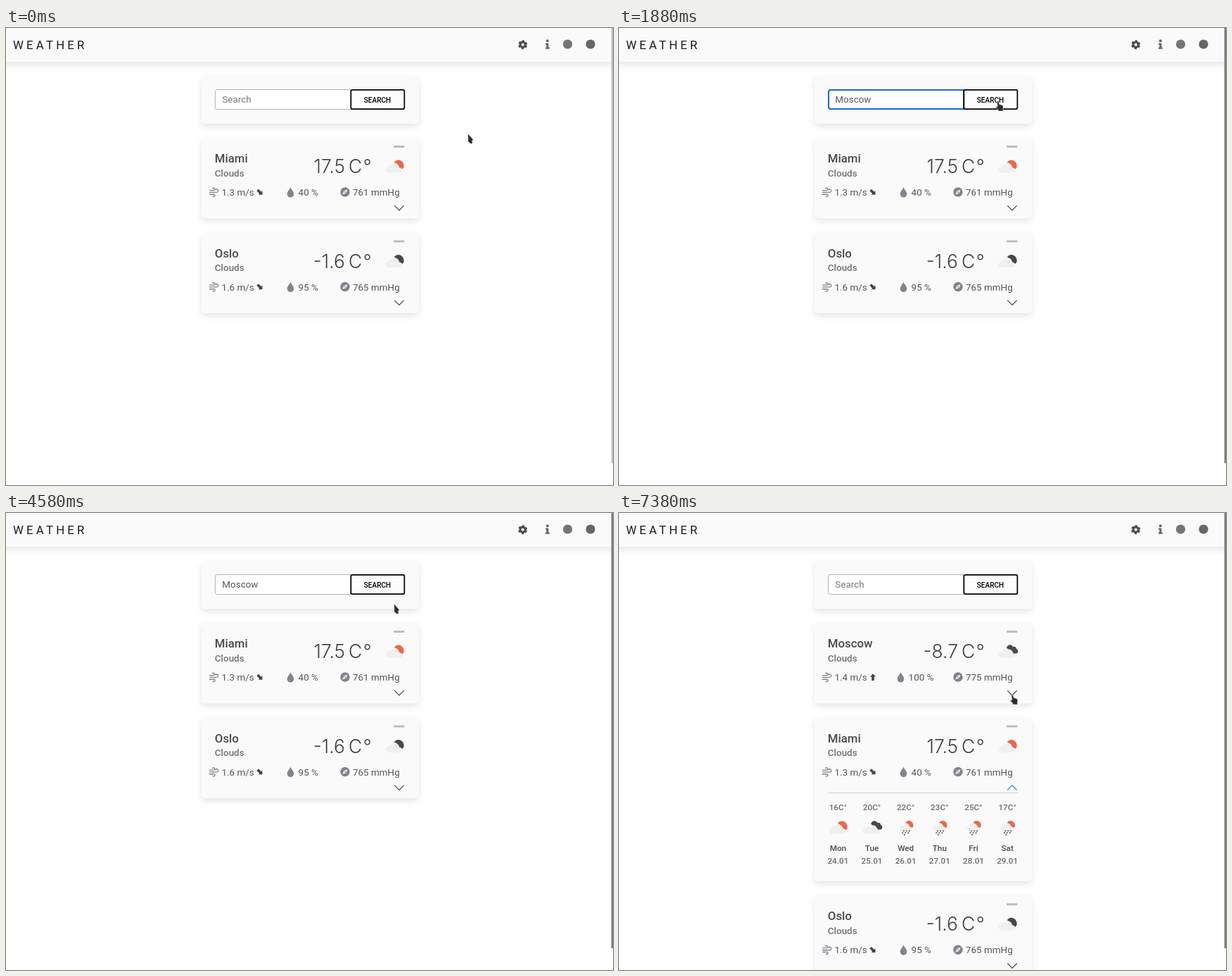
An HTML page for the animation above (8 s loop, 863 px wide and 649 px high).

```html
<!DOCTYPE html>
<html lang="en">
<head>
<meta charset="utf-8">
<title>Weather</title>
<style>
  html, body { margin: 0; width: 100%; height: 100%; overflow: hidden; background: #fff; }
  svg { display: block; font: 13.44px Roboto, sans-serif; fill: #555; }
  .panel { fill: #fafafa; filter: drop-shadow(0 4px 5px rgba(0, 0, 0, .1)); }
  .title { font-size: 16.8px; letter-spacing: 4.2px; fill: #1c1c1c; }
  .city { font-size: 16.8px; font-weight: 500; fill: #4a4a4a; }
  .sky { font-weight: 500; fill: #727272; }
  .temp { font: 300 26.5px Inter, sans-serif; fill: #404040; }
  .num { text-anchor: end; }
  .unit { letter-spacing: 1.4px; }
  .icon { fill: #80848d; }
  .line { fill: none; stroke: #444; stroke-width: 1.2; }
  .day { font-size: 11.76px; font-weight: 500; fill: #6c6c6c; text-anchor: middle; }
  .strong { fill: #4c4c4c; }
  .label { font-size: 10.08px; font-weight: 500; fill: #000; text-anchor: middle; }
</style>
</head>
<body>
<svg id="stage" width="863" height="649" viewBox="0 0 863 649"></svg>
<script>
const LOOP = 8000, PITCH = 134.5;
const ORANGE = '#ee6747', DARK = '#484848';
const stage = document.getElementById('stage');

const text = (x, y, s, cls = '') => `<text x="${x}" y="${y}" class="${cls}">${s}</text>`;
const group = (id, body) => `<g id="${id}">${body}</g>`;

// Weather pictures, centred on 0,0
const cloud = '<path d="M-9 11a4.6 4.6 0 0 1-.8-9.1 5 5 0 0 1 5.2-3.2 7 7 0 0 1 12.4 3.8 4.4 4.4 0 0 1 .2 8.5z" fill="#f0f0f0" stroke="#fafafa"/>';
const sun = color => `<path d="M-1.2-3.9C.7-7.3 5-8.4 8.4-6.5 11.9-4.5 13.4-.6 12.4 3.2L10.2 5.6C9.2 3.8 7.6 3.2 6.2 3.2 6 .2 3.4-2.7-1.2-3.9z" fill="${color}"/>`;
const pictures = {
  day: cloud + sun(ORANGE),
  night: cloud + sun(DARK),
  clouds: cloud + `<path d="M-2-3.5C-1-8.3 5-9.5 7-5c3-1 4.8.8 4.8 3 3.3.7 3.2 6.3-.2 6.6H7.6C6.8.8 4-1.6.2-1.7z" fill="${DARK}"/>`,
  rain: `<g transform="translate(0 -2) scale(.8)">${cloud + sun(ORANGE)}</g>` +
    `<path d="M-4.5 6.5h2m2 0h2m2 0h2M-6 9.2h2m2 0h2m2 0h2M-3.5 11.8h2" stroke="${DARK}" stroke-width="1.5"/>`
};
const picture = (kind, x, y) => `<g transform="translate(${x} ${y})">${pictures[kind]}</g>`;

const arrow = turn =>
  `<path transform="translate(361 233.3) rotate(${turn})" d="M0-5 4-.8H1.8V4.8H-1.8V-.8H-4z" fill="#444"/>`;

function card(id, c) {
  const dx = c.hum > 99 ? -4 : 0;
  return group(id,
    `<rect class="panel" x="278" y="156" width="309" height="114.5" rx="5"/>
    <rect x="551" y="167" width="15.5" height="3" rx="1" fill="#bdbdbd"/>` +
    text(296.8, 191, c.city, 'city') + text(296.8, 210.7, 'Clouds', 'sky') +
    text(482, 206, c.temp, 'temp num') + text(487, 206, 'C°', 'temp unit') +
    picture(c.sky, 553, 195) +
    `<path d="M289 230.6h6a1.7 1.7 0 1 0-1.6-2.3M289 233.4h10.6a2.2 2.2 0 1 0-2-3.2M289 236.2h6.4a1.6 1.6 0 1 1-1.5 2.2" fill="none" stroke="#80848d" stroke-width="1.4"/>` +
    text(306.5, 238, c.wind + ' m/s') + arrow(c.turn) +
    `<path class="icon" transform="translate(${dx} 0)" d="M404.5 226c1.4 4 4.8 6 4.8 9.8a4.8 4.8 0 0 1-9.6 0c0-3.8 3.4-5.8 4.8-9.8z"/>` +
    text(415.6 + dx, 238, c.hum + ' %') +
    `<circle class="icon" cx="482" cy="233" r="6.7"/>
    <path d="M485.6 229.4 483.5 234.5 478.4 236.6 480.5 231.5z" fill="#fafafa"/><circle class="icon" cx="482" cy="233" r="1"/>` +
    text(493, 238, c.press + ' mmHg') +
    '<path class="line chevron" d="M552.3 252.2 559 259l6.7-6.8"/>');
}

const forecast = [
  ['Mon', 16, 'day'], ['Tue', 20, 'clouds'], ['Wed', 22, 'rain'],
  ['Thu', 23, 'rain'], ['Fri', 25, 'rain'], ['Sat', 17, 'rain']
].map(([day, deg, sky], i) => {
  const x = 311.4 + i * 48.15;
  return text(x, 422, deg + 'C°', 'day') + picture(sky, x + .6, 445) +
    text(x, 479.7, day, 'day strong') + text(x, 497.7, 24 + i + '.01', 'day');
}).join('');

const header =
  `<rect class="panel" x="-10" y="-10" width="883" height="58"/>` +
  text(10, 30, 'WEATHER', 'title') +
  `<g fill="none" stroke="#4a4a4a"><circle cx="734.7" cy="23.7" r="3.6" stroke-width="3"/>
  <circle cx="734.7" cy="23.7" r="5.4" stroke-width="2.2" stroke-dasharray="3.2 2.455" stroke-dashoffset="4.43"/></g>
  <g fill="#666"><circle cx="769.8" cy="18.2" r="2"/>
  <path d="M767 21.4h4.4v6.2h1.4v2.2H767v-2.2h1.3v-4H767z"/></g>
  <circle cx="798.5" cy="23" r="6.6" fill="#757575"/>
  <circle cx="831" cy="23" r="6.6" fill="#666"/>`;

const search =
  `<rect class="panel" x="278" y="68" width="309" height="68" rx="5"/>
  <path d="M490 87.5H300.5a3 3 0 0 0-3 3v22a3 3 0 0 0 3 3H490z" fill="#fff" stroke="#b0b0b0"/>
  <path id="focus" d="M490 88H301a3 3 0 0 0-3 3v21a3 3 0 0 0 3 3H490z" fill="none" stroke="#1a66d6" stroke-width="2"/>
  <rect x="490.4" y="87.9" width="76" height="27.2" rx="2" fill="#fdfdfd" stroke="#000" stroke-width="1.7"/>` +
  group('hint', text(307.3, 106, 'Search').replace('<text', '<text fill="#7a7a7a"')) +
  group('query', text(307.3, 106, 'Moscow')) +
  '<rect id="caret" x="308" y="94" width="1" height="15" fill="#333"/>' +
  group('label', text(528, 106, 'SEARCH', 'label')) +
  group('suggest', '<rect x="296.5" y="116.5" width="194" height="26" fill="#fff" stroke="#c8c8c8"/>' +
    text(307.3, 134, 'Moscow'));

const pointers =
  group('arrow', '<path d="M-.4-.2 7.2 8.4 5.7 10.4 6.2 13.8 4 14.6 0 11.6z" fill="#2b2e31" stroke="#fff" stroke-width=".5"/>') +
  group('beam', '<path d="M-3-6.5Q0-6.5 0-4.5Q0-6.5 3-6.5M0-4.5v9M-3 6.5Q0 6.5 0 4.5Q0 6.5 3 6.5M-1.5 1h3" fill="none" stroke="#333" stroke-width="1.1"/>') +
  group('hand', '<path d="M-1.6 1Q-.2-.8 1 1L1.8 4.6 4.6 5Q7.4 5.6 7.4 8L7 11V14H.2V12L-3 9Q-3.4 7-.8 7.6z" fill="#2b2e31" stroke="#fff" stroke-width=".5"/>');

stage.innerHTML = search +
  card('moscow', { city: 'Moscow', temp: '-8.7', sky: 'clouds', wind: 1.4, turn: 0, hum: 100, press: 775 }) +
  card('miami', { city: 'Miami', temp: '17.5', sky: 'day', wind: 1.3, turn: 135, hum: 40, press: 761 }) +
  card('oslo', { city: 'Oslo', temp: '-1.6', sky: 'night', wind: 1.6, turn: 135, hum: 95, press: 765 }) +
  group('forecast', '<path d="M297.5 397.5H567" stroke="#cfcfcf"/>' + forecast) +
  header + '<rect id="bar" x="860.7" y="0" width="2.3" height="618" fill="#777"/>' + pointers;

const $ = id => document.getElementById(id);
const show = (id, on) => $(id).style.display = on ? '' : 'none';
const moveTo = (id, x, y) => $(id).setAttribute('transform', `translate(${x} ${y})`);
const between = (v, a, b) => v >= a && v < b;
const clamp = v => Math.max(0, Math.min(1, v));

// Pointer moves: first step, last step, number of steps, x, y
const moves = [
  [210, 580, 8, 439, 100], [630, 960, 8, 428, 102],
  [1500, 1500, 1, 540, 103], [1670, 1670, 1, 539, 104],
  [4580, 4580, 1, 552, 129], [4750, 4750, 1, 566, 169], [5040, 5040, 1, 567, 178],
  [5250, 5460, 3, 555, 249], [5630, 5830, 3, 560, 340], [6000, 6380, 5, 558.5, 388],
  [6790, 7010, 3, 563, 330], [7130, 7380, 3, 559.5, 258]
];

function pointerAt(t) {
  let x = 657, y = 150;
  for (const [from, to, n, tx, ty] of moves) {
    if (t < from) break;
    const p = t >= to ? 1 : (Math.floor((t - from) / (to - from) * (n - 1)) + 1) / n;
    x += (tx - x) * p;
    y += (ty - y) * p;
  }
  return [x, y];
}

function pointerKind(x, y, t) {
  if (between(y, 87, 116)) {
    if (between(x, 297, 490)) return 'beam';
    if (between(x, 490, 567)) return 'hand';
  }
  const onChevron = between(y, 250, 264) || between(y, 384, 398);
  return t > 5000 && onChevron && between(x, 548, 570) ? 'hand' : 'arrow';
}

function draw(t) {
  const added = t >= 5250, open = t >= 6630;
  const filled = between(t, 1500, 5250);

  show('hint', !filled);
  show('query', filled);
  show('caret', between(t, 960, 1500));
  show('suggest', between(t, 1500, 1880));
  $('focus').style.opacity = t < 2080 ? clamp((t - 960) / 170) : 0;
  $('label').style.opacity = between(t, 2080, 2460) ? .6 + .4 * (t - 2080) / 380 : 1;

  show('moscow', added);
  moveTo('miami', 0, added ? PITCH : 0);
  moveTo('oslo', 0, open ? 387.3 : added ? 2 * PITCH : PITCH);
  show('forecast', open);
  $('miami').querySelector('.panel').setAttribute('height', open ? 232.5 : 114.5);
  const chevron = $('miami').querySelector('.chevron');
  chevron.setAttribute('d', open ? 'M552.3 258.8 559 252l6.7 6.8' : 'M552.3 252.2 559 259l6.7-6.8');
  chevron.style.stroke = open ? '#2a7de1' : '';

  $('bar').style.opacity = t < 210 ? .45 : t < 2790 ? 1 : t < 2960 ? .7 : t < 3130 ? .35 : t < 4580 ? 0 : 1;

  const [x, y] = pointerAt(t), kind = pointerKind(x, y, t);
  for (const id of ['arrow', 'beam', 'hand']) show(id, id === kind);
  moveTo(kind, x, y);
}

const start = performance.now();
function tick() {
  draw((performance.now() - start) % LOOP);
  requestAnimationFrame(tick);
}
tick();
</script>
</body>
</html>
```
